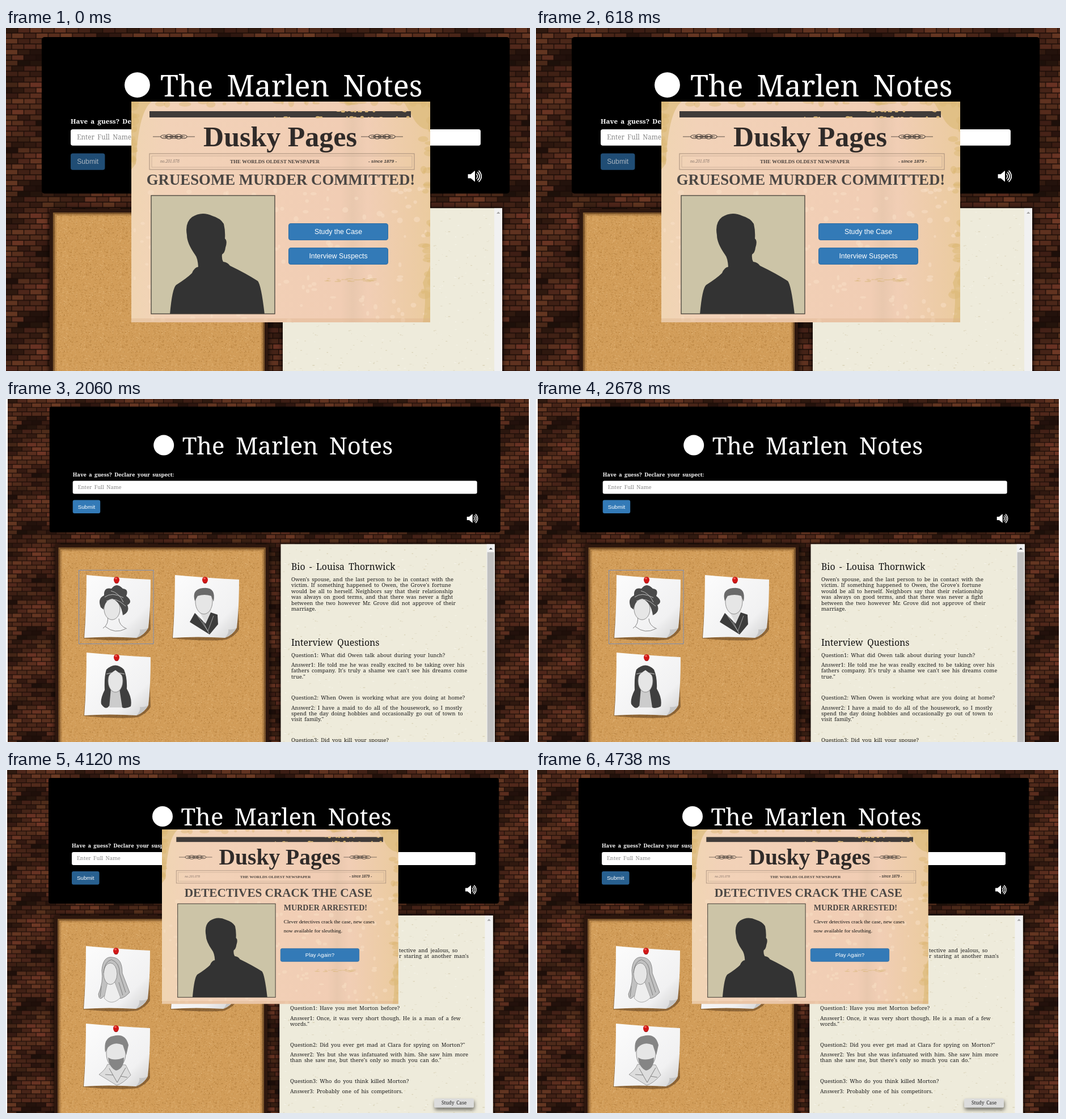
An HTML page for the animation above (5.15 s loop, 924 by 606 pixels).

```html
<!DOCTYPE html>
<html lang="en">
<head>
<meta charset="utf-8">
<title>Detective game</title>
<style>
  html, body { margin: 0; width: 100%; height: 100%; overflow: hidden; background: #fff; }
  svg { display: block; width: 924px; height: 606px; }
  .type { font-family: "Noto Serif", serif; word-spacing: .2em; }
  .ui { font-family: "Liberation Sans", Arial, sans-serif; }
  .news { font-family: "Liberation Serif", Times, serif; }
  .hand { font-family: Lato, sans-serif; font-style: italic; }
  .bold { font-weight: bold; }
  .italic { font-style: italic; }
  .mid { text-anchor: middle; }
  .shade { filter: drop-shadow(0 1px 5px #000); }
  .lift { filter: drop-shadow(1px 4px 3px #0008); }
</style>
</head>
<body>
<svg id="stage" viewBox="0 0 924 606"></svg>
<script>
const HOLD = 1030;
let seed = 7;
const rnd = () => (seed = (seed * 16807) % 2147483647) / 2147483647;
const between = (a, b) => a + rnd() * (b - a);
const repeat = (n, make) => Array.from({ length: n }, (_, i) => make(i)).join('');

const rect = (x, y, w, h, fill, more = '') =>
  `<rect x="${x}" y="${y}" width="${w}" height="${h}" fill="${fill}" ${more}/>`;
const ellipse = (x, y, rx, ry, fill, more = '') =>
  `<ellipse cx="${x}" cy="${y}" rx="${rx}" ry="${ry}" fill="${fill}" ${more}/>`;
const path = (d, fill, more = '') => `<path d="${d}" fill="${fill}" ${more}/>`;
const label = (x, y, size, cls, fill, str) =>
  `<text x="${x}" y="${y}" font-size="${size}" class="${cls}" fill="${fill}">${str}</text>`;
const group = (x, y, k, body) => `<g transform="translate(${x} ${y}) scale(${k})">${body}</g>`;
const line = (color, width = 1) => `stroke="${color}" stroke-width="${width}"`;

// Textures
const pattern = (id, w, h, body) =>
  `<pattern id="${id}" width="${w}" height="${h}" patternUnits="userSpaceOnUse">${body}</pattern>`;

function bricks() {
  const cols = 10, rows = 24, w = 20, h = 9;
  return pattern('brick', cols * w, rows * h, rect(0, 0, cols * w, rows * h, '#1b0c07') + repeat(cols * rows, i => {
    const c = i % cols, r = Math.floor(i / cols);
    const tone = 18 + 5 * Math.sin(r * Math.PI / 6 + 2 * Math.sin(c * Math.PI / 5)) + between(-6, 6);
    const color = `hsl(${between(13, 20)} 50% ${tone}%)`;
    const x = c * w + (r % 2) * w / 2;
    const one = px => rect(px, r * h, w - 1.3, h - 1.4, color);
    return one(x) + (x + w > cols * w ? one(x - cols * w) : '');
  }));
}
const specks = (id, size, base, colors, count, max) => pattern(id, size, size, rect(0, 0, size, size, base) +
  repeat(count, i => rect(between(0, size - 2), between(0, size - 2), between(.6, max), between(.6, 1.6),
    colors[i % colors.length])));

const defs = `<defs>${bricks()}
  ${specks('cork', 64, '#d29d59', ['#e0b273', '#c08a45', '#dcaa69', '#b98442'], 520, 2)}
  ${specks('parchment', 150, '#eeebdb', ['#dcd5bb', '#e3ddc8', '#f6f4e9'], 110, 4)}
  <linearGradient id="sheet" x2="1" y2="1"><stop offset=".1" stop-color="#fbfbfb"/>
    <stop offset=".72" stop-color="#f1f1f2"/><stop offset="1" stop-color="#cfcfcf"/></linearGradient>
  <linearGradient id="news"><stop stop-color="#f0d5b3"/><stop offset=".12" stop-color="#f2d2b8"/>
    <stop offset=".7" stop-color="#f1cdb4"/><stop offset=".74" stop-color="#e9c8ae"/>
    <stop offset=".79" stop-color="#f1ceb5"/><stop offset="1" stop-color="#ebcb9f"/></linearGradient>
  <clipPath id="newsEdge"><rect width="527" height="390"/></clipPath>
  <clipPath id="photoEdge"><rect x="35" y="166" width="218" height="209"/></clipPath>
</defs>`;

// Page
const speaker = path('M0 4.5h4l6-5v16l-6-5h-4z', '#fff') +
  path('M12 4q3 3.5 0 7M13.5 1.5q6 6 0 12M15.3-.5q7.5 8 0 16', 'none', line('#fff', 1.3));

function header({ x, y, w, k, submit, ink }) {
  const inner = w / k;
  return group(x, y, k,
    rect(0, 0, inner, 222, '#000', 'rx="4"') +
    ellipse(inner / 2 - 196, 68, 18, 18, '#fff') +
    label(inner / 2 - 163.5, 84, 42, 'type', '#fff', 'The Marlen Notes') +
    label(41, 123, 9.3, 'type bold', '#fff', 'Have a guess? Declare your suspect:') +
    rect(41, 131, inner - 82, 23, '#fff', 'rx="3"') +
    label(50, 145, 9.4, 'type', '#8a8a8a', 'Enter Full Name') +
    rect(41, 165, 48.5, 23.5, submit, 'rx="3"') +
    label(65.2, 180.3, 9.8, 'ui mid', ink, 'Submit') +
    group(inner - 59, 190, 1, speaker));
}

function boards({ x, y, k, corkW, paperX, paperW, thumb }) {
  const cx = x + 16 * k, cy = y + 249 * k, px = x + paperX, py = y + 243 * k;
  const bar = 14, bx = px + paperW - bar;
  return rect(cx - 6, cy - 6, corkW + 12, 700, '#2d170e', 'class="shade"') +
    rect(cx, cy, corkW, 700, 'url(#cork)') +
    rect(cx + 1.5, cy + 1.5, corkW - 3, 700, 'none', 'stroke="#4a2c12" stroke-opacity=".55" stroke-width="3"') +
    rect(cx + 3, cy + 3, corkW - 6, 700, 'none', 'stroke="#6b431c" stroke-opacity=".25" stroke-width="6"') +
    rect(px, py, paperW, 700, '#eeebdb', 'class="shade"') +
    rect(px, py, paperW, 700, 'url(#parchment)') +
    rect(bx, py, bar, 700, '#f1f1f1') +
    (thumb ? rect(bx + 1, py + 14, bar - 2, 700, '#c1c1c1') : '') +
    path(`M${bx + 4} ${py + 9.5}l3.2-3.5 3.2 3.5z`, thumb ? '#505050' : '#a3a3a3');
}

function page(p) {
  const k = p.k * .86;
  return rect(0, 0, 924, 606, '#fff') +
    group(p.left, 0, k, rect(0, 0, (p.right - p.left) / k, 720, 'url(#brick)')) +
    boards(p) + header(p);
}

// Pinned notes
const note = (x, y, body) => group(x, y, 1,
  path('M0 113Q60 119 96 115Q112 108 118 97L116 40 4 60z', '#3a220c', 'opacity=".45"') +
  path('M5 1Q60 6 118 9Q118 60 114 94Q107 107 93 112Q45 109 1 112Q5 60 5 1z', 'url(#sheet)') +
  path('M93 112Q101 103 99 97Q108 98 114 94Q107 107 93 112z', '#c4c4c4') +
  body +
  ellipse(58, 13, 3.5, 3, '#8d1010') + ellipse(58, 9.5, 5, 5.5, '#d01717') +
  ellipse(57, 7, 2, 1.5, '#ef6a5c'));

const written = (cx, top, step, lines, lastColor = '#222') => lines.map((s, i) =>
  label(cx, top + i * step, 10.3, 'hand mid', i === lines.length - 1 ? lastColor : '#222', s)).join('');

const face = (x, y, rx, ry) => ellipse(x, y, rx, ry, '#e6e6e6', line('#777', .8));
const sketch = (d, color = '#777') => path(d, 'none', line(color, .9));
const portraits = {
  updo: sketch('M42 72Q45 88 34 95M62 78Q62 90 76 96M38 92Q55 106 74 96') + face(50, 61, 14, 19) +
    path('M30 58Q24 42 36 37Q35 22 49 25Q58 13 69 25Q80 26 75 38Q88 48 77 54Q82 66 69 72Q66 50 51 43Q38 44 35 62z', '#4a4a4a') +
    sketch('M37 40Q50 30 70 41M48 29Q62 32 70 49M40 47Q56 38 74 56', '#c8c8c8'),
  coat: path('M40 68L31 84 66 106 81 88 80 71 68 67 59 87z', '#3c3c3c') + path('M46 62L59 86 69 62z', '#ddd') +
    face(56, 48, 15, 22) + path('M40 47Q34 26 54 24Q78 21 73 48L69 38Q57 34 45 38z', '#6a6a6a') +
    sketch('M44 72L63 100 73 73M54 83L65 104', '#aaa'),
  longHair: path('M40 31Q56 16 71 31Q77 45 76 65Q86 82 83 96Q70 103 63 94L45 95Q39 104 31 92Q29 83 37 67Q36 43 40 31z', '#3f3f3f') +
    path('M48 65L45 98H68L63 65z', '#ccc') + face(56, 51, 13, 20) +
    path('M41 46Q43 25 56 27Q70 25 72 46Q65 38 56 32Q46 38 41 46z', '#3f3f3f') +
    sketch('M40 39Q55 34 72 39', '#ddd'),
  wavy: path('M33 44Q35 18 52 21Q69 22 69 49L82 83Q67 99 59 91L37 89Q28 100 27 86Q36 65 33 44z', '#c1c1c1', line('#777', .8)) +
    path('M43 65L37 93Q50 108 66 92L56 65z', '#eee', line('#999', .8)) + face(48, 50, 12, 19) +
    sketch('M36 48Q38 28 50 25Q65 31 64 49L75 83M63 65L70 88M32 72L30 91'),
  bearded: path('M28 91Q40 82 43 73L75 74 84 92Q69 108 59 110z', '#ddd', line('#888', .8)) + face(58, 54, 17, 25) +
    path('M39 52Q35 26 53 23Q75 17 80 39L76 57 70 39Q55 32 44 43z', '#858585') +
    path('M44 61Q55 68 72 61Q72 81 58 84Q46 79 44 61z', '#858585') +
    sketch('M46 80L60 105 75 79M53 92L39 91M66 94L78 96'),
  hat: path('M13 94Q25 78 19 59Q26 52 31 64L26 84 40 98z', '#ccc') +
    path('M31 58L43 47 75 51 88 65 87 91 67 96 35 94z', '#ccc', line('#444')) +
    path('M48 52L58 75 72 53z', '#444') + path('M53 55L58 68 65 55z', '#e6e6e6') + face(61, 40, 11, 16) +
    path('M45 36Q50 19 61 23Q72 18 75 32L80 34Q65 42 45 36z', '#aaa', line('#333')) +
    path('M49 32Q63 35 76 29L76 33Q62 39 48 36z', '#333') +
    sketch('M43 52L49 93M76 54L70 92M38 70L42 90M81 69L82 86', '#333')
};

// Newspaper
const ornament = x => group(x, 62, 1,
  sketch('M0 0H14M60 0H74', '#4d443d') +
  repeat(5, i => ellipse(20 + i * 8.5, 0, i === 2 ? 7 : 6, i % 2 ? 4 : 3, 'none', line('#4d443d', 1.2))) +
  ellipse(37, 0, 20, 1, '#4d443d'));

function stain() {
  const side = Math.floor(between(0, 3));
  const along = rnd(), depth = 14 * rnd() ** 2;
  const [x, y] = [[along * 527, depth * .7], [527 - depth, along * 390], [depth * .6, along * 110]][side];
  return ellipse(x, y, between(2, 11), between(2, 8), '#d9b46e', 'opacity=".42"');
}
const newsTexture = rect(0, 0, 527, 390, 'url(#news)') +
  repeat(170, () => ellipse(between(0, 527), between(145, 390), between(2, 6), between(2, 5), '#f8dfc4', 'opacity=".55"')) +
  repeat(85, stain) +
  path('M480 0H527V50Q506 50 494 23zM0 0H36Q12 18 8 110L0 120zM527 290V390H514Q522 345 514 320z', '#dcba79', 'opacity=".65"') +
  repeat(24, () => ellipse(between(345, 430), between(312, 318), between(2, 7), 1, '#d9b77c', 'opacity=".5"')) +
  rect(0, 383, 527, 7, '#d9ae86', 'opacity=".35"');

const masthead = rect(32, 17, 461, 11, '#403b39') +
  repeat(28, () => ellipse(between(230, 490), rnd() < .5 ? 17.5 : 27.5, between(1, 4), between(.5, 2), '#d9b678')) +
  ornament(38) + ornament(405) +
  label(262.5, 79, 50, 'news bold mid', '#302b29', 'Dusky Pages') +
  rect(32, 92, 467, 28, 'none', line('#a58d7b')) + rect(36, 96, 459, 20, 'none', line('#c3a993', .8)) +
  label(51, 108, 7.5, 'news italic', '#85746a', 'no.201.078') +
  label(253, 108.5, 9, 'news bold mid', '#4a423d', 'THE WORLDS OLDEST NEWSPAPER') +
  label(443, 108, 8, 'ui bold italic mid', '#4a423d', '- since 1879 -');

const figure = '<g clip-path="url(#photoEdge)">' + rect(35, 166, 218, 209, '#ccc4a7') +
  path('M68 376Q72 330 79 324Q98 312 107 303Q111 293 118 292Q117 276 112 270Q98 250 98 236Q94 214 107 204Q124 193 143 202Q157 206 163 216Q166 229 165 242Q170 246 166 258Q165 267 160 270Q159 278 162 283Q170 284 174 290Q203 304 223 317Q229 324 235 376z', '#333') +
  '</g>' + rect(35, 166, 218, 209, 'none', line('#45413a', 1.3));

const button = (x, y, str) => rect(x + .5, y + .5, 175, 29, '#337ab7', `rx="3.5" ${line('#2e6da4')}`) +
  label(x + 88, y + 18.8, 12.3, 'ui mid', '#fff', str);

const newspaper = (x, y, k, headX, headY, headline, body) => group(x, y, k,
  `<g clip-path="url(#newsEdge)">${newsTexture}</g>` + masthead +
  label(headX, headY, 26.8, 'news bold mid', '#4b4744', headline) + figure + body);

// Right-hand reading panel
const copy = (x, rows, size = 9.4, step = 10.4) => rows.map(([y, ...lines]) =>
  lines.map((s, i) => label(x, y + i * step, size, 'type', '#1c1c1c', s)).join('')).join('');
const heading = (x, y, str) => label(x, y, 15.8, 'type', '#111', str);
const tab = (x, y, str) => rect(x, y, 70, 16, '#dcdcdc', 'rx="2" class="lift"') +
  label(x + 35, y + 10.5, 8.3, 'type mid', '#222', str);

const DIM = { submit: '#204d75', ink: '#a9b4bf' };
const LIT = { submit: '#337ab7', ink: '#fff' };
const PRESSED = { submit: '#286090', ink: '#fff' };
const wide = { k: 1, x: 76, w: 795, corkW: 365, paperX: 408, paperW: 377, left: 2, right: 922 };

const scenes = [
  page({ ...DIM, x: 63, y: 16, w: 825, k: 1.245, corkW: 373, paperX: 425, paperW: 387, left: 0, right: 924 }) +
  newspaper(221, 130, 1, 263.5, 146.5, 'GRUESOME MURDER COMMITTED!',
    button(277, 215, 'Study the Case') + button(277, 258, 'Interview Suspects')),

  page({ ...wide, ...DIM, y: 6 }) +
  note(136, 298, written(58, 41, 12, ['Gilbert showed', 'no signs of', 'remorse following', 'the incident'])) +
  note(292, 298, written(59, 38, 12.2, ['Blood found on', 'the Library', 'Window Pane-', 'Point of escape?'], '#e01010')) +
  note(136, 462, written(60, 39, 13.5, ['Owen was last', 'seen at a', 'Bistro with his', 'spouse Louisa.'])) +
  note(292, 462, portraits.hat) +
  heading(502, 295, 'Game Rules') + heading(502, 399, 'Scenario') +
  copy(502, [
    [315, 'Play this game as the London\'s top detective Corbin Marlen to solve the',
      'cities most complicated crimes. You have managed to skillfully narrow',
      'down culprit to three key suspects. Interrogate these suspects and use the',
      'notes you took from the crime scene to accuse them of murder.'],
    [418.5, 'Gilbert Grove, the CEO of London\'s top tobacco pipe manufacturer was at',
      'the age to retire. He was a workaholic, and spent more time traveling than',
      'he did with his children. It was obvious that the business would be passed',
      'down to his son Owen Grove, even though Owen hated the tobacco industry.',
      'The morning of the day before Gilbert planned on stepping down , Owen\'s',
      'deformed body was found in the sewer.']], 8.3, 12.65) +
  tab(757, 500, 'Interview'),

  page({ ...wide, ...LIT, x: 76.7, y: 13.6, left: 3, thumb: true }) +
  note(137, 310, portraits.updo) + note(293, 310, portraits.coat) + note(137, 447, portraits.longHair) +
  rect(128.5, 302.5, 131.5, 130, 'none', line('#7e8fb4')) +
  heading(503, 302, 'Bio - Louisa Thornwick') + heading(503, 436, 'Interview Questions') +
  copy(503, [
    [322, 'Owen\'s spouse, and the last person to be in contact with the',
      'victim. If something happened to Owen, the Grove\'s fortune',
      'would be all to herself. Neighbors say that their relationship',
      'was always on good terms, and that there was never a fight',
      'between the two however Mr. Grove did not approve of their', 'marriage.'],
    [456, 'Question1: What did Owen talk about during your lunch?'],
    [473, 'Answer1: He told me he was really excited to be taking over his',
      'fathers company. It\'s truly a shame we can\'t see his dreams come', 'true."'],
    [531, 'Question2: When Owen is working what are you doing at home?'],
    [548.5, 'Answer2: I have a maid to do all of the housework, so I mostly',
      'spend the day doing hobbies and occasionally go out of town to', 'visit family."'],
    [606, 'Question3: Did you kill your spouse?']]),

  page({ ...wide, ...PRESSED, y: 13, left: 3 }) +
  note(136, 309.5, portraits.updo) + note(292, 309.5, portraits.coat) + note(136, 446, portraits.longHair) +
  copy(698, [[321, 'lunch with his wife, his']]) +
  copy(694, [[331.5, 'r witnessed the murder.']]) +
  copy(502, [
    [413.5, 'Question1: The day of the murder did anything suspicious', 'happen?"'],
    [441, 'Answer1: It was a normal day, except Owen was in the library,',
      'which is unusual. I assumed he was filling out paperwork for', 'his new position however. "'],
    [499, 'Question2: We found blood on the window pane. Did you not', 'notice the blood while cleaning?'],
    [527, 'Answer2: I was told to clean the room the next day to let Owen', 'concentrate."'],
    [574, 'Question3: Did you kill Owen?'],
    [592, 'Answer3: What reason do I have to kill? I was simply doing my', 'job.']]) +
  newspaper(276, 103, .793, 267, 150, 'Murderer Remains At Large',
    label(271, 180, 17.8, 'news bold', '#4b4744', 'Detectives Remain Baffled') +
    label(276, 202, 9, 'news', '#111', 'Owen Grove\'s murder remains at large as detectives make') +
    label(273, 218.5, 9, 'news', '#111', 'false accusations.') + button(264, 266, 'Play Again?')),

  page({ ...wide, ...PRESSED, x: 75, y: 14, w: 794, corkW: 364, paperX: 407.5, paperW: 376, right: 921 }) +
  note(136, 310, portraits.wavy) + note(290, 310, '') + note(136, 447, portraits.bearded) +
  copy(693, [[322, 'tective and jealous, so', 'r staring at another man\'s']]) +
  copy(501, [
    [424, 'Question1: Have you met Morton before?'],
    [441.5, 'Answer1: Once, it was very short though. He is a man of a few', 'words."'],
    [488.5, 'Question2: Did you ever get mad at Clara for spying on Morton?"'],
    [506, 'Answer2: Yes but she was infatuated with him. She saw him more',
      'than she saw me, but there\'s only so much you can do."'],
    [553, 'Question3: Who do you think killed Morton?'],
    [571, 'Answer3: Probably one of his competitors.']]) +
  tab(755, 580.5, 'Study Case') +
  newspaper(275, 105, .791, 259.5, 150, 'DETECTIVES CRACK THE CASE',
    label(271.5, 180.5, 17.8, 'news bold', '#4b4744', 'MURDER ARRESTED!') +
    label(271.5, 209.5, 11.7, 'news', '#111', 'Clever detectives crack the case, new cases') +
    label(271.5, 230, 11.7, 'news', '#111', 'now available for sleuthing.') + button(264, 265.5, 'Play Again?'))
];

const stage = document.getElementById('stage');
stage.innerHTML = defs + scenes.map(s => `<g class="scene" display="none">${s}</g>`).join('');
const layers = [...stage.querySelectorAll('.scene')];
let shown = -1;

function draw(time) {
  const now = Math.floor(time / HOLD) % layers.length;
  if (now === shown) return;
  layers.forEach((layer, i) => layer.setAttribute('display', i === now ? 'inline' : 'none'));
  shown = now;
}

const start = performance.now();
function tick() {
  draw(performance.now() - start);
  requestAnimationFrame(tick);
}
tick();
</script>
</body>
</html>
```
